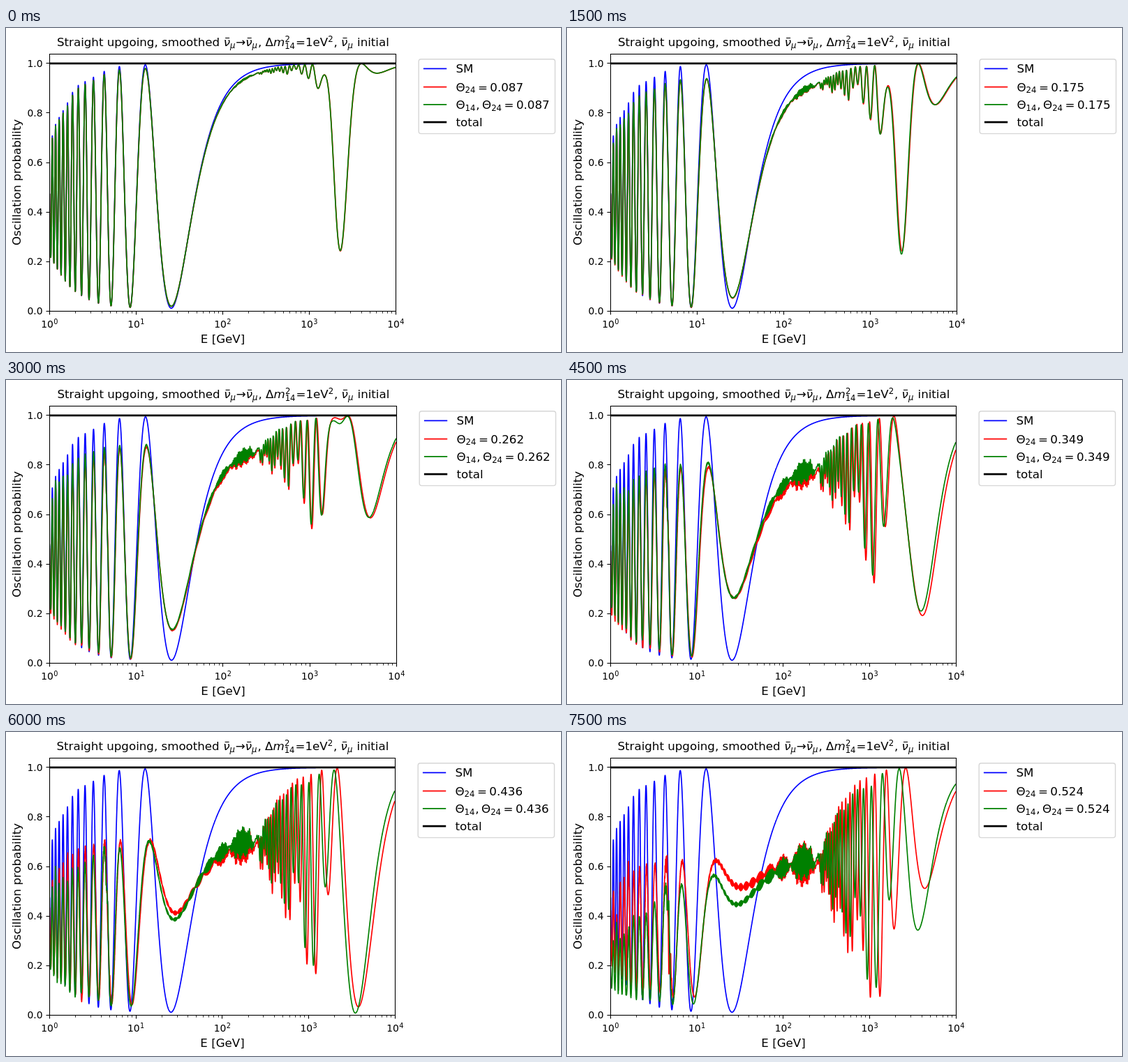
An HTML page for the animation above (8000 ms loop, 795 by 465 pixels).

```html
<!DOCTYPE html>
<html lang="en">
<head>
<meta charset="utf-8">
<title>Oscillation probability</title>
<style>
  html, body { margin: 0; width: 100%; height: 100%; overflow: hidden; background: #fff; }
  svg { display: block; }
  text { font: 16.67px "DejaVu Sans", sans-serif; fill: #000; white-space: pre; }
  .tick { font-size: 13.89px; }
  .sub { font-size: 11.67px; }
  .exp { font-size: 9.72px; }
  .it { font-style: italic; }
  .end { text-anchor: end; }
  .mid { text-anchor: middle; }
  .curve { fill: none; stroke-width: 1.67; stroke-linejoin: round; }
  .axis { fill: none; stroke: #000; stroke-width: 1.1; }
</style>
</head>
<body>
<svg id="stage" width="795" height="465" viewBox="0 0 795 465"></svg>
<script>
const HOLD = 1500, LOOP = 8000, SCENES = 6;
const SAMPLES = 10000, HALF_WINDOW = 25;
const LEFT = 62.4, TOP = 37.5, BASE = 406.3, UNIT = 355.4;

// ---- Physics: antineutrino survival through the Earth, 3+1 flavours ----

const DEG = Math.PI / 180;
const MASS = [0, 7.42e-5, 2.575e-3, 1];
// Shells from the surface to the centre: length (km), density (g/cc), electron fraction
const SHELLS = [
  [670, 3.56, .4957], [741, 4.60, .4957], [740, 5.01, .4957], [740, 5.38, .4957],
  [753, 10.46, .4656], [753, 11.34, .4656], [753, 11.95, .4656], [1221, 12.98, .4656]
];

function mixing(t14, t24) {
  const U = new Float64Array(16);
  for (let i = 0; i < 4; i++) U[5 * i] = 1;
  const turn = (i, j, angle) => {
    const c = Math.cos(angle), s = Math.sin(angle);
    for (let r = 0; r < 16; r += 4) {
      const a = U[r + i], b = U[r + j];
      U[r + i] = c * a - s * b;
      U[r + j] = s * a + c * b;
    }
  };
  turn(1, 3, t24);
  turn(0, 3, t14);
  turn(1, 2, 42.1 * DEG);
  turn(0, 2, 8.6 * DEG);
  turn(0, 1, 33.45 * DEG);
  return U;
}

// Matter potential of one shell in the mass basis, rad/km
function potential(U, [, rho, ye]) {
  const cc = 3.867e-4 * rho * ye, nc = 1.933e-4 * rho * (1 - ye);
  const diag = [nc - cc, nc, nc, 0];
  const M = new Float64Array(16);
  for (let i = 0; i < 4; i++)
    for (let j = 0; j < 4; j++)
      for (let f = 0; f < 4; f++) M[4 * i + j] += U[4 * f + i] * diag[f] * U[4 * f + j];
  return M;
}

const A = new Float64Array(16), re = new Float64Array(4), im = new Float64Array(4);
const logP = new Uint8Array(64), logQ = new Uint8Array(64);
const logC = new Float64Array(64), logS = new Float64Array(64);

function spin(v, p, q, c, s) {
  const a = v[p], b = v[q];
  v[p] = c * a - s * b;
  v[q] = s * a + c * b;
}

// Apply exp(-iAL) to the state: Jacobi rotations, phases, rotations undone
function propagate(len) {
  let n = 0;
  for (let sweep = 0, busy = true; busy && sweep < 8; sweep++) {
    busy = false;
    for (let p = 0; p < 3; p++) for (let q = p + 1; q < 4; q++) {
      const a = A[4 * p + q];
      if (Math.abs(a) < 1e-8) continue;
      busy = true;
      const h = (A[5 * q] - A[5 * p]) / (2 * a);
      const t = (h < 0 ? -1 : 1) / (Math.abs(h) + Math.sqrt(h * h + 1));
      const c = 1 / Math.sqrt(t * t + 1), s = t * c;
      A[5 * p] -= t * a;
      A[5 * q] += t * a;
      A[4 * p + q] = A[4 * q + p] = 0;
      for (let k = 0; k < 4; k++) {
        if (k === p || k === q) continue;
        const x = A[4 * k + p], y = A[4 * k + q];
        A[4 * k + p] = A[4 * p + k] = c * x - s * y;
        A[4 * k + q] = A[4 * q + k] = s * x + c * y;
      }
      spin(re, p, q, c, s);
      spin(im, p, q, c, s);
      logP[n] = p; logQ[n] = q; logC[n] = c; logS[n++] = s;
    }
  }
  for (let k = 0; k < 4; k++) {
    const c = Math.cos(A[5 * k] * len), s = Math.sin(A[5 * k] * len), x = re[k], y = im[k];
    re[k] = c * x + s * y;
    im[k] = c * y - s * x;
  }
  while (n--) {
    spin(re, logP[n], logQ[n], logC[n], -logS[n]);
    spin(im, logP[n], logQ[n], logC[n], -logS[n]);
  }
}

// The path is symmetric about the centre, so half of it gives the amplitude
function survival(E, U, matter) {
  for (let k = 0; k < 4; k++) { re[k] = U[4 + k]; im[k] = 0; }
  for (let l = 0; l < SHELLS.length; l++) {
    A.set(matter[l]);
    for (let k = 1; k < 4; k++) A[5 * k] += 2.534 * MASS[k] / E;
    propagate(SHELLS[l][0]);
  }
  let x = 0, y = 0;
  for (let k = 0; k < 4; k++) {
    x += re[k] * re[k] - im[k] * im[k];
    y += 2 * re[k] * im[k];
  }
  return x * x + y * y;
}

// Centred mean over log-spaced energies
function smoothed(t14, t24) {
  const U = mixing(t14, t24), matter = SHELLS.map(s => potential(U, s));
  const sums = new Float64Array(SAMPLES + 1);
  for (let i = 0; i < SAMPLES; i++)
    sums[i + 1] = sums[i] + survival(10 ** (4 * i / (SAMPLES - 1)), U, matter);
  return Float64Array.from({ length: SAMPLES }, (_, i) => {
    const from = Math.max(0, i - HALF_WINDOW), to = Math.min(SAMPLES, i + HALF_WINDOW + 1);
    return (sums[to] - sums[from]) / (to - from);
  });
}

// ---- Drawing ----

const stage = document.getElementById("stage");

function add(parent, name, attrs, text) {
  const el = document.createElementNS("http://www.w3.org/2000/svg", name);
  for (const k in attrs) el.setAttribute(k, attrs[k]);
  if (text !== undefined) el.textContent = text;
  parent.appendChild(el);
  return el;
}

const line = (g, x1, y1, x2, y2, stroke, width) =>
  add(g, "line", { x1, y1, x2, y2, stroke, "stroke-width": width });

// parts: [string, x, rise, class]
function rich(g, x, y, parts) {
  const t = add(g, "text", {});
  for (const [s, dx, rise = 0, cls = ""] of parts)
    add(t, "tspan", { x: x + dx, y: y - rise, class: cls }, s);
}

function drawTitle(g, x) {
  const nu = at => {
    line(g, x + at + 2.4, 14.4, x + at + 8.4, 14.4, "#000", 1.1);
    return [["ν", at, 0, "it"], ["μ", at + 9.3, -2.8, "it sub"]];
  };
  rich(g, x, 26, [
    ["Straight upgoing, smoothed", 0], ...nu(238.7), ["→", 256.3], ...nu(270.3), [",", 288],
    ["Δ", 298.6], ["m", 310, 0, "it"], ["2", 326.4, 6.3, "sub"], ["14", 326.2, -4.2, "sub"],
    ["=1eV", 342], ["2", 388.2, 6.3, "sub"], [",", 396.5], ...nu(407.1), ["initial", 430]
  ]);
}

function drawAxes(g, width) {
  const right = 62.5 + width;
  add(g, "rect", { class: "axis", x: 62.5, y: TOP, width, height: 406.5 - TOP });
  for (let i = 0; i <= 5; i++) {
    const y = BASE - UNIT * i / 5, py = Math.floor(y) + .5;
    line(g, 57.5, py, 62.5, py, "#000", 1.1);
    add(g, "text", { class: "tick end", x: 52.6, y: y + 5.1 }, (i / 5).toFixed(1));
  }
  for (let d = 0; d <= 4; d++) {
    const x = LEFT + width * d / 4, px = Math.floor(x) + .5;
    line(g, px, 406.5, px, 411.5, "#000", 1.1);
    rich(g, x - 12.2, 430, [["10", 0, 0, "tick"], [d, 18, 5.3, "exp"]]);
    for (let m = 2; m < 10 && d < 4; m++) {
      const mx = Math.floor(x + width / 4 * Math.log10(m)) + .5;
      line(g, mx, 406.5, mx, 409.6, "#000", .83);
    }
  }
  add(g, "text", { class: "mid", x: (62.5 + right) / 2, y: 452.2 }, "E [GeV]");
  add(g, "text", { class: "mid", transform: "translate(21.3 221.5) rotate(-90)" }, "Oscillation probability");
}

function drawLegend(g, x, theta) {
  add(g, "rect", { x, y: 44.8, width: 195.3, height: 106.8, rx: 3.3, fill: "#fff", stroke: "#ccc", "stroke-opacity": .8, "stroke-width": 1.39 });
  const tx = x + 53.3, value = theta.toFixed(3);
  const angle = (at, index) => [["Θ", at], [index, at + 13.1, -2.8, "sub"]];
  const equals = at => [["=", at + 31.5], [value, at + 48.8]];
  const row = (y, color, width, parts) => {
    line(g, x + 6.7, y, x + 40, y, color, width);
    rich(g, tx, y + 5.9, parts);
  };
  row(58.4, "#00f", 1.67, [["SM", 0]]);
  row(84.6, "#f00", 1.67, [...angle(0, "24"), ...equals(0)]);
  row(109.8, "#008000", 1.67, [...angle(0, "14"), [",", 28.7], ...angle(37.6, "24"), ...equals(37.6)]);
  row(135.2, "#000", 2.78, [["total", 0]]);
}

function drawCurve(g, data, width, stroke) {
  let d = "M";
  for (let i = 0; i < SAMPLES; i++)
    d += (LEFT + width * i / (SAMPLES - 1)).toFixed(2) + " " + (BASE - UNIT * data[i]).toFixed(2) + " ";
  add(g, "path", { class: "curve", d, stroke });
}

const standard = smoothed(0, 0);

function buildScene(i) {
  const theta = (i + 1) * 5 * DEG;
  const shift = [0, 0, 1, -1, -1, -1][i], width = 496 + shift;
  const g = add(stage, "g", { display: "none" });
  const clip = add(g, "clipPath", { id: "plot" + i });
  add(clip, "rect", { x: 62, y: 37, width: width + 1, height: 370 });
  const plot = add(g, "g", { "clip-path": `url(#plot${i})` });
  drawCurve(plot, standard, width, "#00f");
  drawCurve(plot, smoothed(0, theta), width, "#f00");
  drawCurve(plot, smoothed(theta, theta), width, "#008000");
  line(plot, 62, BASE - UNIT, 63 + width, BASE - UNIT, "#000", 2.78);
  drawAxes(g, width);
  drawTitle(g, 73 + shift / 2);
  drawLegend(g, 591.2 + shift, theta);
  return g;
}

const scenes = Array.from({ length: SCENES }, (_, i) => buildScene(i));
let shown = -1, start;

function show(time) {
  const i = Math.min(SCENES - 1, Math.floor(time % LOOP / HOLD));
  if (i === shown) return;
  scenes.forEach((g, k) => g.setAttribute("display", k === i ? "inline" : "none"));
  shown = i;
}

function tick(now) {
  if (start === undefined) start = now;
  show(now - start);
  requestAnimationFrame(tick);
}

show(0);
requestAnimationFrame(tick);
</script>
</body>
</html>
```
